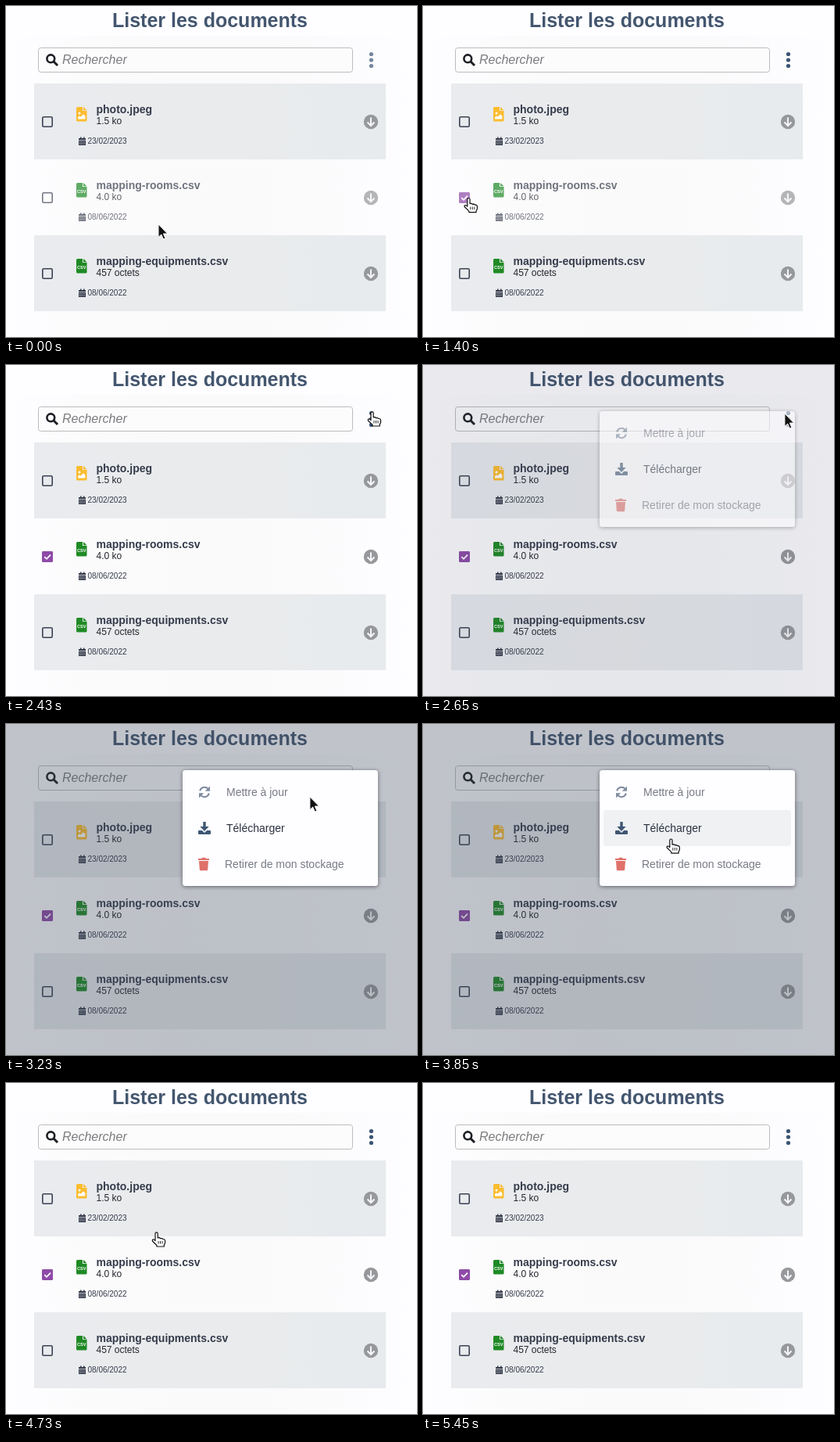
Animation, 526 px wide and 423 px high, one loop 5.72 s. Source, as an HTML page:

```html
<!DOCTYPE html>
<html lang="fr">
<head>
<meta charset="utf-8">
<title>Lister les documents</title>
<style>
html, body { margin: 0; width: 526px; height: 423px; overflow: hidden; background: #fdfdfe }
svg { display: block; font-family: "Liberation Sans", Arial, sans-serif }
.name { font: bold 14px "Liberation Sans", Arial, sans-serif; fill: #353b4b }
.size { font-size: 12px; fill: #24262d }
.date { font-size: 10px; fill: #353b4b }
.item { font-size: 14px; fill: #777b85 }
</style>
</head>
<body>
<svg width="526" height="423" viewBox="0 0 526 423">
  <defs>
    <linearGradient id="page">
      <stop offset="0" stop-color="#fefdff"/><stop offset=".4" stop-color="#fafafa"/>
      <stop offset=".65" stop-color="#fafafb"/><stop offset="1" stop-color="#fefdff"/>
    </linearGradient>
    <linearGradient id="band">
      <stop offset="0" stop-color="#e9ebee"/><stop offset=".5" stop-color="#eaebec"/><stop offset="1" stop-color="#e7ebee"/>
    </linearGradient>
    <filter id="shadow" x="-10%" y="-10%" width="120%" height="125%">
      <feDropShadow dx="0" dy="1" stdDeviation="2.5" flood-color="#222" flood-opacity=".6"/>
    </filter>
  </defs>
  <rect width="526" height="423" fill="#fefdff"/>
  <rect y="38" width="526" height="385" fill="url(#page)"/>
  <text x="261" y="27" text-anchor="middle" font-size="25" font-weight="bold" fill="#43566f">Lister les documents</text>

  <rect x="41.5" y="53.5" width="402" height="31" rx="3" fill="#fcfcfc" stroke="#bcbcbf"/>
  <g fill="none" stroke="#1d1f25" stroke-width="2.6"><circle cx="57.3" cy="67.3" r="4.9"/><path d="M61 71l5 5" stroke-width="3"/></g>
  <text x="72" y="74" font-size="16" font-style="italic" fill="#7c7c80">Rechercher</text>

  <g id="kebab" fill="#3b5575"><circle cx="467.5" cy="61.5" r="2.6"/><circle cx="467.5" cy="69" r="2.6"/><circle cx="467.5" cy="76.5" r="2.6"/></g>
  <g id="rows"></g>

  <rect id="dim" width="526" height="423" fill="#3c485c"/>
  <g id="menu">
    <rect x="226" y="59" width="250" height="148" rx="4" fill="#fefdff" filter="url(#shadow)"/>
    <rect id="hover" x="231" y="110" width="240" height="46" rx="3" fill="#eff1f3"/>
    <g fill="none" stroke="#7f8c9f" stroke-width="2">
      <path d="M248.2 85.5a6 6 0 0 1 10.4-2.6M259.8 88.500a6 6 0 0 1-10.4 2.600"/>
      <path d="M261 79.500v6.200h-6.200zM247 94.500v-6.200h6.200z" fill="#7f8c9f" stroke="none"/>
    </g>
    <path fill="#3f5673" d="M252.300 125h3.400v6h4l-5.700 6-5.700-6h4zM247 136h3.800l3.200 3 3.200-3h3.800q1 0 1 1v3q0 1-1 1h-14q-1 0-1-1v-3q0-1 1-1z"/>
    <path fill="#df716a" d="M246 172h4l1-1.200h4l1 1.200h4v2h-14zM247 175h12l-.8 11q-.1 1.300-1.400 1.300h-7.600q-1.300 0-1.400-1.300z"/>
    <text class="item" x="282" y="92">Mettre à jour</text>
    <text class="item" x="282" y="138" style="fill:#2b3140">Télécharger</text>
    <text class="item" x="280" y="184">Retirer de mon stockage</text>
  </g>

  <g id="cursor">
    <path id="arrow" d="M0 0V16.500l3.800-3.500 2.600 6 2.600-1.100-2.600-5.900h5.300z" fill="#111" stroke="#fff" stroke-width="1"/>
    <g id="hand" stroke="#111" stroke-width="1.200" stroke-linejoin="round">
      <path fill="#fff" d="M-2 1.500a1.600 1.600 0 0 1 3.200 0V7l1.500-.3q1.300-.1 1.700 1l1.500-.2q1.300 0 1.700 1l1 0q2 .2 2 2.200v2.600l-1.300 3V18H0v-1.500l-5.400-5.300q-.8-1.200.1-2 1-.7 2.100.2L-2 10.500z"/>
      <path fill="none" d="M2 11v3.500M4.500 11v3.500M7 11v3.500" stroke-width=".9"/>
    </g>
    <path id="beam" fill="none" stroke="#111" d="M-3-8h2l1 1 1-1h2M0-7V7M-3 8h2l1-1 1 1h2"/>
  </g>
</svg>
<script>
const LOOP = 5720, CHECK = 1400, OPEN = 2480, CLOSE = 4730;
const $ = id => document.getElementById(id);
const show = (id, on) => $(id).style.display = on ? '' : 'none';
const ramp = (t, a, b) => Math.min(1, Math.max(0, (t - a) / (b - a)));

const photo = '<circle cx="4" cy="8" r="1.500" fill="#fff"/><path d="M2 15.500v-2.300l2-1.900 1.500 1.400 3.500-3.500 2.300 2.300v4z" fill="#fff"/>';
const csv = '<text x="6.700" y="13" text-anchor="middle" font-size="5.600" font-weight="bold" fill="#fff">CSV</text>';
const fileIcon = (color, inner) => `<g transform="translate(90 129)">
  <path d="M1.500 0H8v5h5.500v12q0 1.500-1.500 1.500H1.500Q0 18.500 0 17V1.500Q0 0 1.500 0zM9 0l4.500 4.200H9z" fill="${color}"/>${inner}</g>`;

const row = (i, name, size, date, icon) => `<g transform="translate(0 ${i * 97})">
  ${i % 2 ? '' : '<rect x="36" y="99" width="450" height="97" fill="url(#band)"/>'}
  <g id="row${i}">
    <rect x="46.800" y="141.800" width="12.400" height="12.400" rx="1.500" fill="none" stroke="#3a4152" stroke-width="1.600"/>
    <g id="tick${i}" style="display:none"><rect x="46" y="141" width="14" height="14" rx="2" fill="#8e4ba8"/>
      <path d="M49.300 148.200l2.700 2.700 5-5.300" fill="none" stroke="#fff" stroke-width="1.700"/></g>
    ${icon}
    <text class="name" x="115.500" y="137">${name}</text>
    <text class="size" x="115.500" y="151">${size}</text>
    <path d="M95 167.500h1.500v1.500h2.500v-1.500h1.500v1.500h1.500v2h-9v-2h2zM93 171.700h9v6.300h-9z" fill="#353b4b"/>
    <path d="M94 173.700h7M94 176h7" stroke="#e9ebed" stroke-width="1.100" stroke-dasharray="1.300 1.300"/>
    <text class="date" x="104.500" y="176">${date}</text>
    <circle cx="467" cy="148" r="9.200" fill="#97989b"/>
    <path d="M467 142.500v10M462.500 148.500l4.500 4.500 4.500-4.500" fill="none" stroke="#f4f5f6" stroke-width="2"/>
  </g></g>`;

$('rows').innerHTML =
  row(0, 'photo.jpeg', '1.5 ko', '23/02/2023', fileIcon('#fcbc2f', photo)) +
  row(1, 'mapping-rooms.csv', '4.0 ko', '08/06/2022', fileIcon('#1f8a25', csv)) +
  row(2, 'mapping-equipments.csv', '457 octets', '08/06/2022', fileIcon('#1f8a25', csv));

// Pointer path: time, x, y
const path = [
  [0, 195, 279], [150, 195, 279], [600, 102, 252], [950, 102, 252], [1200, 58, 246],
  [1400, 58, 246], [1930, 463, 52], [2050, 463, 52], [2350, 469, 60], [2600, 469, 60],
  [3130, 406, 82], [3230, 389, 93], [3700, 320, 147], [3850, 318, 147], [4350, 205, 190],
  [4450, 193, 191], [4780, 193, 191], [5200, 145, 131], [5400, 97, 2], [5450, 90, -30], [LOOP, 90, -30]
];

function pointer(t) {
  const i = path.findIndex(p => p[0] > t);
  const [a, b] = [path[i - 1], path[i]];
  const k = ramp(t, a[0], b[0]);
  return [a[1] + (b[1] - a[1]) * k, a[2] + (b[2] - a[2]) * k];
}

function draw(t) {
  const [x, y] = pointer(t);
  const inside = (l, top, r, bottom) => x >= l && x < r && y >= top && y < bottom;
  const open = t >= OPEN && t < CLOSE;
  const onItem = open && t > 3230 && inside(231, 110, 471, 156);
  const onPage = !open && t >= 150;
  const hand = onItem || onPage && (inside(36, 99, 486, 390) || inside(452, 45, 486, 90));
  const beam = onPage && inside(41, 53, 444, 85);

  $('row1').setAttribute('opacity', 0.7 + 0.3 * ramp(t, 1500, 1800));
  $('kebab').setAttribute('opacity', t < CHECK ? 0.7 : 1);
  show('tick1', t >= CHECK);

  $('dim').setAttribute('opacity', open ? 0.32 * ramp(t, OPEN, 3000) : 0);
  $('menu').setAttribute('opacity', open ? ramp(t, OPEN + 40, 2750) : 0);
  show('hover', onItem);

  $('cursor').setAttribute('transform', `translate(${x.toFixed(1)} ${y.toFixed(1)})`);
  show('hand', hand);
  show('beam', beam);
  show('arrow', !hand && !beam);
}

function frame() {
  draw(performance.now() % LOOP);
  requestAnimationFrame(frame);
}
frame();
</script>
</body>
</html>
```
